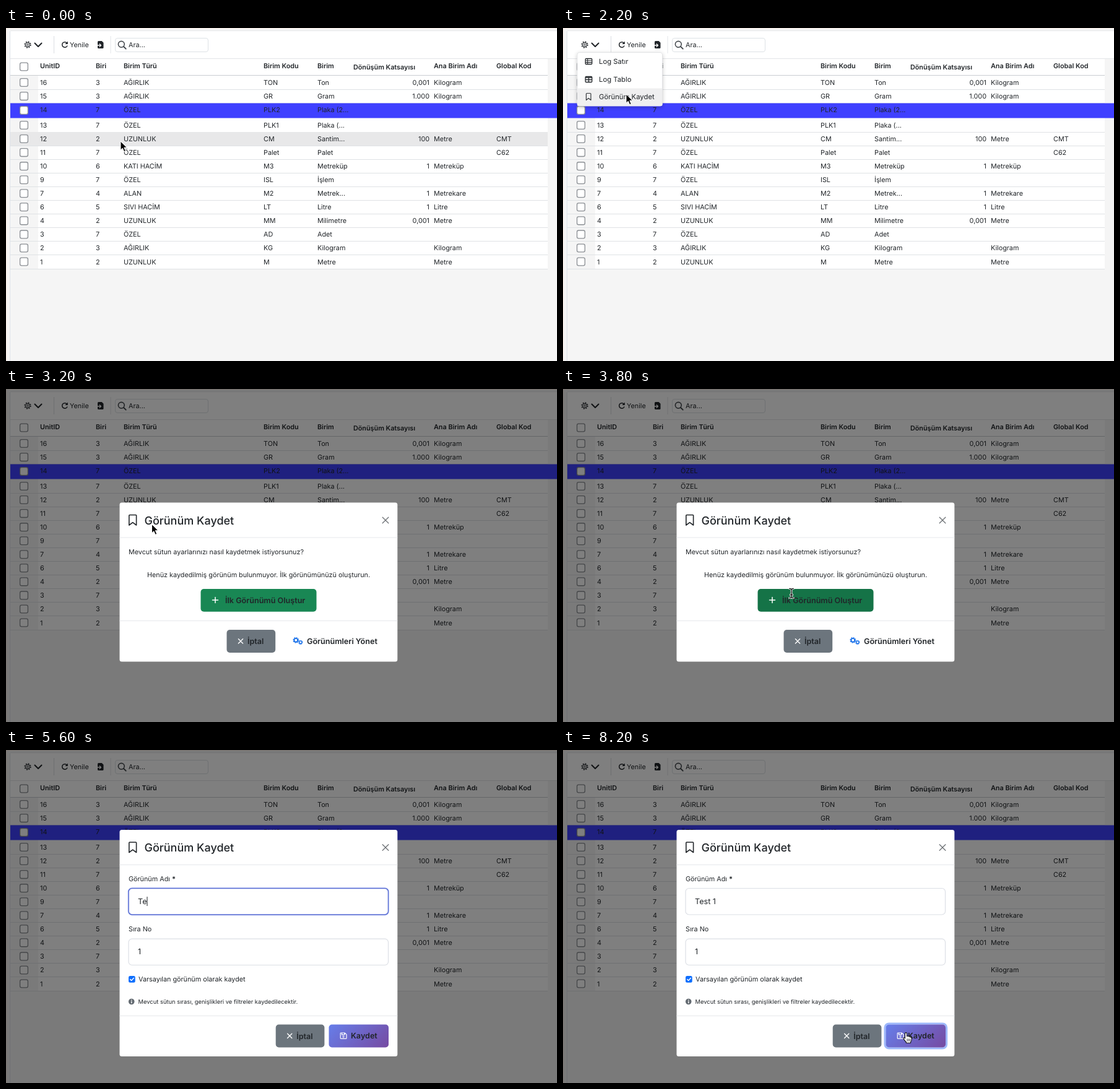
These frames come from a looping animation (890 by 538 pixels, 8.4 s). An HTML page:

```html
<!DOCTYPE html>
<html lang="tr">
<head>
<meta charset="utf-8">
<title>Görünüm Kaydet</title>
<style>
html, body { margin: 0; width: 100%; height: 100%; overflow: hidden; background: #f5f5f5; }
svg { display: block; width: 890px; height: 538px; }
text { font-family: Inter, "Liberation Sans", sans-serif; font-size: 10.8px; fill: #212529; white-space: pre; text-rendering: geometricPrecision; }
</style>
</head>
<body>
<svg id="stage" viewBox="0 0 890 538" xmlns="http://www.w3.org/2000/svg">
  <defs>
    <linearGradient id="violet" gradientUnits="userSpaceOnUse" x1="536" y1="428" x2="603" y2="495">
      <stop offset="0" stop-color="#667eea"/><stop offset="1" stop-color="#764ba2"/>
    </linearGradient>
    <filter id="shadow" x="-10%" y="-10%" width="120%" height="130%">
      <feDropShadow dx="0" dy="2" stdDeviation="3" flood-color="#000" flood-opacity=".22"/>
    </filter>
  </defs>
</svg>
<script>
const LOOP = 8400, STEP = 200;
const stage = document.getElementById('stage');

function el(parent, tag, attrs, content) {
  const n = document.createElementNS('http://www.w3.org/2000/svg', tag);
  for (const k in attrs) n.setAttribute(k, attrs[k]);
  if (content !== undefined) n.textContent = content;
  return parent.appendChild(n);
}
const group = (p, attrs) => el(p, 'g', attrs);
const rect = (p, x, y, w, h, fill, attrs) => el(p, 'rect', { x, y, width: w, height: h, fill, ...attrs });
const text = (p, x, y, s, attrs) => el(p, 'text', { x, y, ...attrs }, s);
const line = (p, d, stroke, width = 1, attrs) =>
  el(p, 'path', { d, stroke, 'stroke-width': width, fill: 'none', 'stroke-linecap': 'round', 'stroke-linejoin': 'round', ...attrs });
const shape = (p, d, fill, attrs) => el(p, 'path', { d, fill, ...attrs });
const ring = (p, cx, cy, r, stroke, width, attrs) =>
  el(p, 'circle', { cx, cy, r, stroke, 'stroke-width': width, fill: 'none', ...attrs });
const hline = (p, x1, x2, y, color) => rect(p, x1, y - .5, x2 - x1, 1, color);
const show = (n, on) => n.setAttribute('visibility', on ? 'visible' : 'hidden');

const cross = (p, x, y, r, color, w) =>
  line(p, `M${x - r} ${y - r}l${2 * r} ${2 * r}m0 ${-2 * r}l${-2 * r} ${2 * r}`, color, w);
const bookmark = (p, x, y, w, h, color, sw) =>
  line(p, `M${x} ${y + h}V${y + 1}q0 -1 1 -1h${w - 2}q1 0 1 1V${y + h}l${-w / 2} ${-h * .27}z`, color, sw);
const checkbox = (p, y) =>
  rect(p, 22.6, y - 6.4, 12.8, 12.8, '#fff', { rx: 2.6, stroke: '#8b8f94', 'stroke-width': 1.3 });

function gear(p, x, y, r, color, w) {
  ring(p, x, y, r * .62, color, w);
  ring(p, x, y, r * .9, color, r * .3, { 'stroke-dasharray': `${r * .36} ${r * .9 * Math.PI / 4 - r * .36}` });
}

// ---------- table page ----------
const page = group(stage);
rect(page, 0, 0, 890, 538, '#f5f5f5');
rect(page, 0, 0, 890, 1, '#fbefe6');
rect(page, 0, 0, 1, 538, '#fbefe6');
rect(page, 7, 5, 883, 45, '#fff');
rect(page, 7, 50, 868, 27, '#fff');
rect(page, 52, 77, 823, 312, '#fff');
hline(page, 7, 890, 4.5, '#e6e8ea');
hline(page, 7, 890, 49.5, '#e3e5e8');
rect(page, 6, 5, 1, 533, '#dfe3ea');

gear(page, 35, 27, 5.4, '#33373b', 1.1);
ring(page, 35, 27, 1.3, '#33373b', .9);
line(page, 'M46.5 24.5L52 30l5.500 -5.500', '#212529', 2);
rect(page, 77, 13, 1, 28, '#dcdfe3');
line(page, 'M98.300 24.200A4.300 4.300 0 1 0 98.800 29', '#212529', 1.5);
shape(page, 'M99.800 21.600v4.400h-4.400z', '#212529');
text(page, 103, 31, 'Yenile');
shape(page, 'M149.500 21h5.200l2.800 2.800v7.700q0 1.500 -1.500 1.500h-6.500q-1.500 0 -1.500 -1.500v-9q0 -1.500 1.500 -1.500z', '#212529');
line(page, 'M146.500 28h7m-2.400 -2.400l2.400 2.400l-2.400 2.400', '#fff', 1.3);
rect(page, 168.500, 13, 1, 28, '#e3e6e9');
rect(page, 176.500, 16.500, 150, 22, '#fff', { rx: 3.500, stroke: '#dee2e6' });
ring(page, 186.300, 26.300, 4.900, '#43484d', 1.6);
line(page, 'M190 30l3.700 3.700', '#43484d', 1.9);
text(page, 198, 31, 'Ara...', { fill: '#7a8087' });

checkbox(page, 62.5);
const HEAD = [
  ['UnitID', 55], ['Biri', 145], ['Birim Türü', 190, '#f0221b'], ['Birim Kodu', 416, '#f0221b'], ['Birim', 503],
  ['Dönüşüm Katsayısı', 561, '#111', 67], ['Ana Birim Adı', 691, '#85898d'], ['Global Kod', 792]
];
for (const [s, x, fill = '#111', y = 64.500] of HEAD) text(page, x, y, s, { fill, 'font-weight': 600 });
hline(page, 7, 875, 76.500, '#c9cdd1');

const COLS = [55, 145, 190, 416, 503, 684, 691, 792];
const ROWS = `16|3|AĞIRLIK|TON|Ton|0,001|Kilogram
15|3|AĞIRLIK|GR|Gram|1.000|Kilogram
14|7|ÖZEL|PLK2|Plaka (2...
13|7|ÖZEL|PLK1|Plaka (...
12|2|UZUNLUK|CM|Santim...|100|Metre|CMT
11|7|ÖZEL|Palet|Palet|||C62
10|6|KATI HACİM|M3|Metreküp|1|Metreküp
9|7|ÖZEL|ISL|İşlem
7|4|ALAN|M2|Metrek...|1|Metrekare
6|5|SIVI HACİM|LT|Litre|1|Litre
4|2|UZUNLUK|MM|Milimetre|0,001|Metre
3|7|ÖZEL|AD|Adet
2|3|AĞIRLIK|KG|Kilogram||Kilogram
1|2|UZUNLUK|M|Metre||Metre`.split('\n').map(r => r.split('|'));
const SELECTED = 2;
const rowY = i => i <= SELECTED ? 88 + 22.1 * i : 157 + 22.05 * (i - 3);
const rowTop = i => i === 3 ? 145.500 : rowY(i) - 11;

const hover = ROWS.map((cells, i) => {
  const y = rowY(i), top = rowTop(i), chosen = i === SELECTED;
  const bg = chosen
    ? rect(page, 7, 121.500, 883, 24, '#3f40ff')
    : rect(page, 7, top, 868, 22, '#e8e8e9');
  if (!chosen) hline(page, 7, 875, Math.round(y + 11) + .5, '#dfe2e5');
  checkbox(page, chosen ? 133 : y);
  cells.forEach((s, c) => s && text(page, COLS[c], y + 4, s,
    { fill: chosen ? '#fff' : '#212529', 'text-anchor': c === 5 ? 'end' : 'start' }));
  return { bg, top, chosen };
});

// ---------- dropdown ----------
const menu = group(stage);
rect(menu, 23, 39.500, 137.500, 86.500, '#fff', { rx: 3.500, stroke: '#dcdee0', 'stroke-width': .8, filter: 'url(#shadow)' });
const menuHover = rect(menu, 23.400, 97.500, 136.700, 28, '#efeff0');
['Log Satır', 'Log Tablo', 'Görünüm Kaydet'].forEach((s, i) =>
  text(menu, 58, 58 + 28.700 * i, s, { style: 'font-size:11.3px' }));
rect(menu, 36.200, 49.500, 10.600, 9, 'none', { rx: 1.300, stroke: '#212529', 'stroke-width': 1.300 });
line(menu, 'M36.500 52.700h10M36.500 55.600h10M39.700 50v8', '#212529', 1.100);
rect(menu, 36.200, 78.500, 10.600, 9, 'none', { rx: 1.300, stroke: '#212529', 'stroke-width': 1.300 });
line(menu, 'M36.500 80h10M36.500 83.500h10M41.500 80v7', '#212529', 1.300);
bookmark(menu, 37.500, 105.500, 7.500, 11, '#33373b', 1.200);

// ---------- dialogs ----------
const dim = rect(stage, 0, 0, 890, 538, '#000', { opacity: .5 });

function dialog(top, height, footer) {
  const g = group(stage);
  rect(g, 183.500, top, 448.800, height, '#fff', { rx: 3.500 });
  bookmark(g, 198.800, top + 20, 11.800, 16.500, '#212529', 1.600);
  text(g, 223.500, top + 35, 'Görünüm Kaydet', { style: 'font-size:18px', 'font-weight': 500 });
  cross(g, 613, top + 28.500, 4.800, '#6d7175', 1.300);
  hline(g, 183.500, 632.300, top + 56.500, '#e6e8eb');
  hline(g, 183.500, 632.300, footer, '#e6e8eb');
  return g;
}
const label = (p, x, y, s, fill) => text(p, x, y, s, { fill, 'font-weight': 600, style: 'font-size:12.6px' });
function button(p, x, y, w, h, fill) {
  return rect(p, x, y, w, h, fill, { rx: 5 });
}
function cancel(p, x, y) {
  button(p, x, y, 78.700, 37, '#6c757d');
  cross(p, x + 22.500, y + 18.300, 3.600, '#fff', 1.400);
  label(p, x + 33.500, y + 23, 'İptal', '#fff');
}

const intro = dialog(183.500, 257, 374.500);
text(intro, 198, 266.500, 'Mevcut sütun ayarlarınızı nasıl kaydetmek istiyorsunuz?');
text(intro, 228, 304, 'Henüz kaydedilmiş görünüm bulunmuyor. İlk görünümünüzü oluşturun.');
const create = button(intro, 314.500, 323, 187, 36.700, '#198754');
line(intro, 'M333.500 341h9M338 336.500v9', '#fff', 1.500);
label(intro, 354, 345.500, 'İlk Görünümü Oluştur', '#fff');
cancel(intro, 356.500, 389);
const BLUE = '#1b72ea';
gear(intro, 468.300, 405.800, 4.700, BLUE, 1.900);
gear(intro, 475.800, 409.300, 3.500, BLUE, 1.400);
label(intro, 486, 411.500, 'Görünümleri Yönet', BLUE);

const form = dialog(129, 366, 429.500);
text(form, 198, 211.500, 'Görünüm Adı');
text(form, 268, 211.500, '*', { fill: '#b3151f', 'font-weight': 700 });
const glow = rect(form, 198, 223.500, 419.500, 42.500, 'none', { rx: 5.500, stroke: '#667eea', 'stroke-width': 4, opacity: .16 });
const box = rect(form, 198, 223.500, 419.500, 42.500, '#fff', { rx: 5.500 });
const mark = rect(form, 213, 236, 64, 17, '#b4d5fe');
const name = text(form, 213, 248.800, '', { style: 'font-size:12.6px' });
const caret = rect(form, 213, 237, 1, 15, '#212529');
text(form, 198, 293, 'Sıra No');
rect(form, 198, 305.200, 419.500, 42.300, '#fff', { rx: 5.500, stroke: '#dcdfe5', 'stroke-width': 1.200 });
text(form, 213, 330, '1', { style: 'font-size:12.6px' });
rect(form, 198, 365, 10.700, 10.700, '#0d6efd', { rx: 2.500 });
line(form, 'M200.600 370.600l2 2l3.700 -4', '#fff', 1.400);
text(form, 214, 374, 'Varsayılan görünüm olarak kaydet');
el(form, 'circle', { cx: 202.700, cy: 406.500, r: 4.800, fill: '#646b72' });
rect(form, 202, 405.800, 1.400, 3.400, '#fff');
rect(form, 202, 403.500, 1.400, 1.400, '#fff');
text(form, 213.500, 410, 'Mevcut sütun sırası, genişlikleri ve filtreler kaydedilecektir.', { fill: '#6c757d', style: 'font-size:9.4px' });
cancel(form, 435.700, 443.500);
const focus = rect(form, 520, 442, 99.500, 40, 'none', { rx: 6.500, stroke: '#9db8fb', 'stroke-width': 3.200 });
button(form, 521.500, 443.500, 96.500, 37, 'url(#violet)');
line(form, 'M541 457h6l3 2.600v6q0 .8 -.8 .8h-8.200q-.8 0 -.8 -.8v-7.800q0 -.8 .8 -.8zM542.500 457.300v2.900h4.200v-2.900', '#fff', 1.200);
ring(form, 545, 463.300, 1.200, '#fff', 1);
label(form, 557, 466, 'Kaydet', '#fff');

// ---------- pointers, each with its hot spot at 0,0 ----------
const pointer = group(stage);
const arrow = group(pointer), beam = group(pointer), hand = group(pointer);
shape(arrow, 'M0 0V14.300L3.300 11.200L5.700 16.800L8.200 15.700L5.800 10.200H10.400Z', '#000',
  { stroke: '#fff', 'stroke-width': 1, 'stroke-linejoin': 'round' });
for (const [c, w] of [['#fff', 3], ['#111', 1.300]])
  line(beam, 'M-3.200 -7.500Q0 -7.500 0 -5.500V5.500Q0 7.500 -3.200 7.500M3.200 -7.500Q0 -7.500 0 -5.500M0 5.500Q0 7.500 3.200 7.500M-1.800 2.500H1.800', c, w);
shape(hand, 'M-1.600 1.200Q-1.600 -.4 0 -.4Q1.500 -.4 1.500 1.200V5.400Q3.700 4.300 4.500 6Q6.300 5.400 6.900 7Q9 6.500 9 8.700V11Q8.800 13.500 7.500 14.800V16.300H.3V15Q-1.700 13 -3.800 9.900Q-4.900 8 -3.500 7.700Q-2.600 7.600 -1.600 9Z', '#fff',
  { stroke: '#111', 'stroke-width': 1.100, 'stroke-linejoin': 'round' });
line(hand, 'M2 9.800v3.500M4.200 9.800v3.500M6.400 9.800v3.500', '#111', .8);

// time, x, y
const PATH = [
  [0, 185, 183], [1000, 49, 28], [1200, 49, 28], [1800, 100, 105], [2200, 102, 107],
  [2800, 102, 107], [3600, 369, 330], [4000, 369, 330], [4400, 336, 231], [5200, 336, 231],
  [6800, 378, 381], [7000, 378, 381], [7800, 554, 457], [8400, 554, 457]
];
const ease = u => u * u * (3 - 2 * u);
function place(t) {
  let i = 0;
  while (i < PATH.length - 2 && t >= PATH[i + 1][0]) i++;
  const [t0, x0, y0] = PATH[i], [t1, x1, y1] = PATH[i + 1];
  const u = ease((t - t0) / (t1 - t0));
  return [x0 + (x1 - x0) * u, y0 + (y1 - y0) * u];
}
const within = (t, a, b) => t >= a && t < b;

function typed(t) {
  if (t < 5400) return 'Görünüm 1';
  const keys = t < 6400 ? Math.min(4, (t - 5400) / STEP + 1) : (t - 6400) / STEP + 5;
  return 'Test 1'.slice(0, keys);
}

function draw(ms) {
  const t = Math.floor((ms % LOOP) / STEP) * STEP;
  const [x, y] = place(t);
  const open = within(t, 1200, 2600), modal = t >= 2400, filling = t >= 4200;

  hover.forEach(r => r.chosen || show(r.bg, !modal && !open && y >= r.top && y < r.top + 22));
  show(menu, open);
  menuHover.setAttribute('visibility', open && y > 97 ? 'inherit' : 'hidden');
  show(dim, modal);
  show(intro, modal && !filling);
  create.setAttribute('fill', within(t, 3600, 4200) ? '#157347' : '#198754');
  show(form, filling);

  const active = filling && within(t, 4600, 8200), full = active && t > 4600;
  box.setAttribute('stroke', full ? '#5267d2' : active ? '#b9bee4' : '#dcdfe5');
  box.setAttribute('stroke-width', full ? 1.500 : 1.200);
  show(glow, full);
  name.textContent = typed(t);
  const width = filling ? name.getComputedTextLength() : 0;
  const marked = within(t, 4800, 5400);
  show(mark, marked);
  mark.setAttribute('width', width);
  caret.setAttribute('x', t < 5400 ? 213 : 213 + width);
  show(caret, active && !marked && !within(t, 7200, 7800));
  show(focus, t >= 8200);

  const text = within(t, 3400, 5400), click = t >= 7600;
  const visible = !within(t, 5400, 6800);
  pointer.setAttribute('transform', `translate(${x} ${y})`);
  show(arrow, visible && !text && !click);
  show(beam, visible && text);
  show(hand, click);
}

function tick(now) {
  draw(now);
  requestAnimationFrame(tick);
}
draw(0);
requestAnimationFrame(tick);
</script>
</body>
</html>
```
